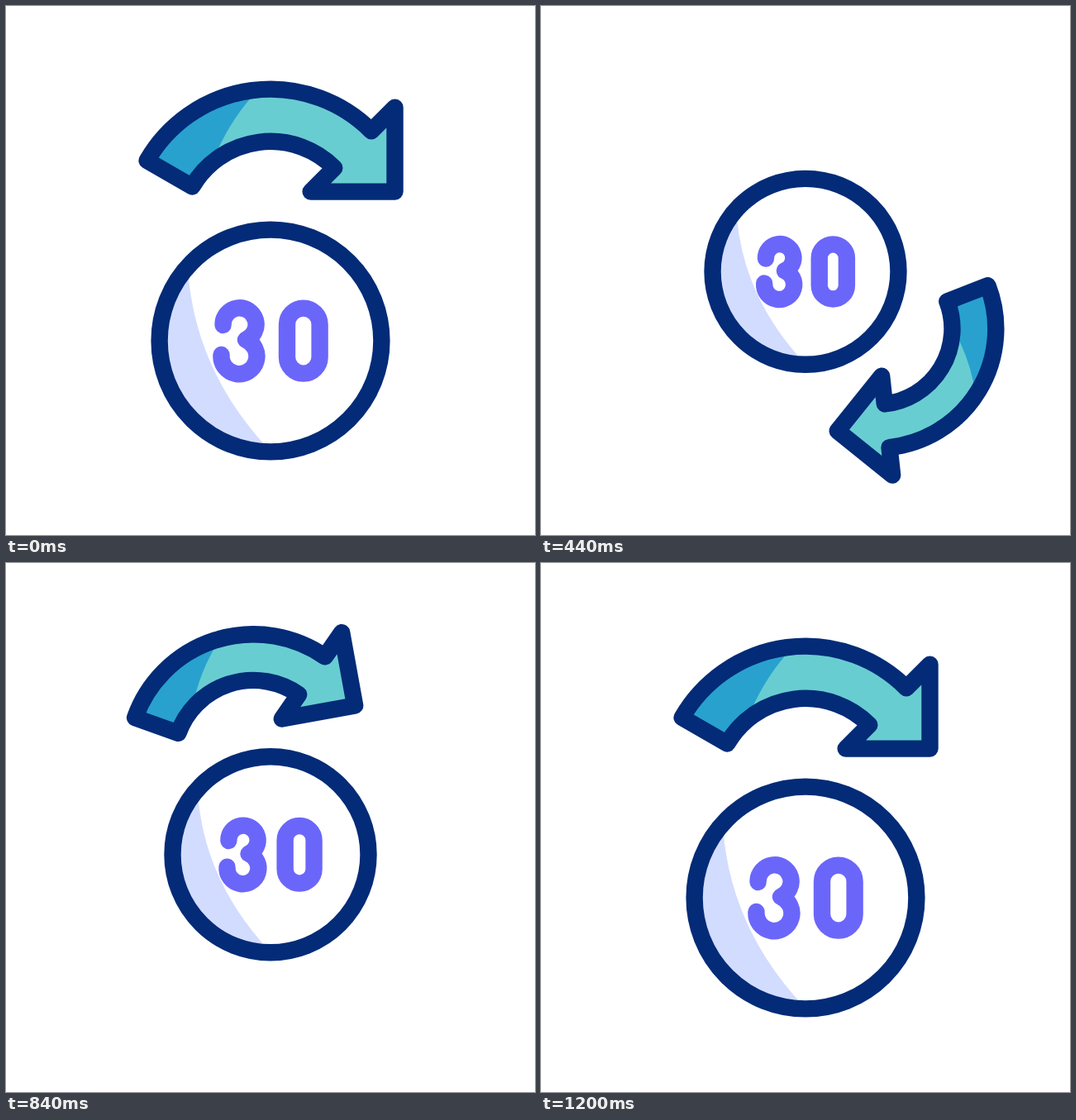
An HTML page for the animation above (2120 ms loop, 640 px wide and 640 px high).

```html
<!DOCTYPE html>
<html lang="en">
<head>
<meta charset="utf-8">
<title>Skip forward 30</title>
<style>
  html, body { margin: 0; width: 100%; height: 100%; overflow: hidden; background: #fff; }
  svg { display: block; width: 100%; height: 100%; }
  .line { fill: none; stroke: #032b77; stroke-linecap: round; stroke-linejoin: round; }
  .digit { stroke: #6b66fa; }
</style>
</head>
<body>
<svg viewBox="0 0 640 640">
  <defs>
    <path id="shape" d="M170.6 187A172.5 172.5 0 0 1 442 151.2L470.5 122.7V224.6H368.6L397.3 195.9A109.3 109.3 0 0 0 225.3 218.5Z"/>
  </defs>
  <g id="icon">
    <g id="arrow">
      <use href="#shape" fill="#68cdd1"/>
      <path fill="#28a1cf" d="M170.6 187A172.5 172.5 0 0 1 305 101.6Q270 138 250 188.5A109.3 109.3 0 0 0 225.3 218.5Z"/>
      <use href="#shape" class="line"/>
    </g>
    <path fill="#d2dcfe" d="M220 318Q228 440 317.5 536A134 134 0 0 1 220 318Z"/>
    <circle class="line" cx="320" cy="405" r="134.4"/>
    <path class="line digit" d="M262.6 386A20 20 0 1 1 290 403.8A21.5 21.5 0 1 1 260.5 422"/>
    <rect class="line digit" x="340" y="365.6" width="39.6" height="79" rx="19.8"/>
  </g>
</svg>
<script>
const LOOP = 2120;
const LINE_WIDTH = 20.4;
const icon = document.getElementById('icon');
const arrow = document.getElementById('arrow');

// Cubic Bezier easing from (0,0) to (1,1) with handles (x1,0) and (x2,1).
const bezier = (x1, x2) => x => {
  if (x <= 0) return 0;
  if (x >= 1) return 1;
  let lo = 0, hi = 1, u = 0.5;
  for (let i = 0; i < 24; i++) {
    u = (lo + hi) / 2;
    const v = 1 - u;
    if (3 * x1 * u * v * v + 3 * x2 * u * u * v + u * u * u < x) lo = u;
    else hi = u;
  }
  return u * u * (3 - 2 * u);
};

const spin = bezier(0.6, 0.4);
const gather = bezier(0.7, 0.78);
const release = bezier(0.22, 0.3);

// Time, height, scale, and the easing that leads to this pose.
const poses = [
  [0, 405, 1],
  [180, 456, 1.1, gather],
  [600, 302.5, 0.8, release],
  [1020, 456, 1.05, gather],
  [1200, 405, 1, release]
];

function poseAt(t) {
  const i = poses.findIndex(p => p[0] > t);
  if (i < 0) return [405, 1];
  const [t0, y0, s0] = poses[i - 1];
  const [t1, y1, s1, ease] = poses[i];
  const k = ease((t - t0) / (t1 - t0));
  return [y0 + (y1 - y0) * k, s0 + (s1 - s0) * k];
}

const start = performance.now();

function draw() {
  const t = (performance.now() - start) % LOOP;
  const [y, scale] = poseAt(t);
  icon.setAttribute('transform', `translate(320 ${y}) scale(${scale}) translate(-320 -405)`);
  icon.setAttribute('stroke-width', LINE_WIDTH / scale); // lines keep their weight
  arrow.setAttribute('transform', `rotate(${360 * spin(t / 1000)} 320 405)`);
  requestAnimationFrame(draw);
}
draw();
</script>
</body>
</html>
```
